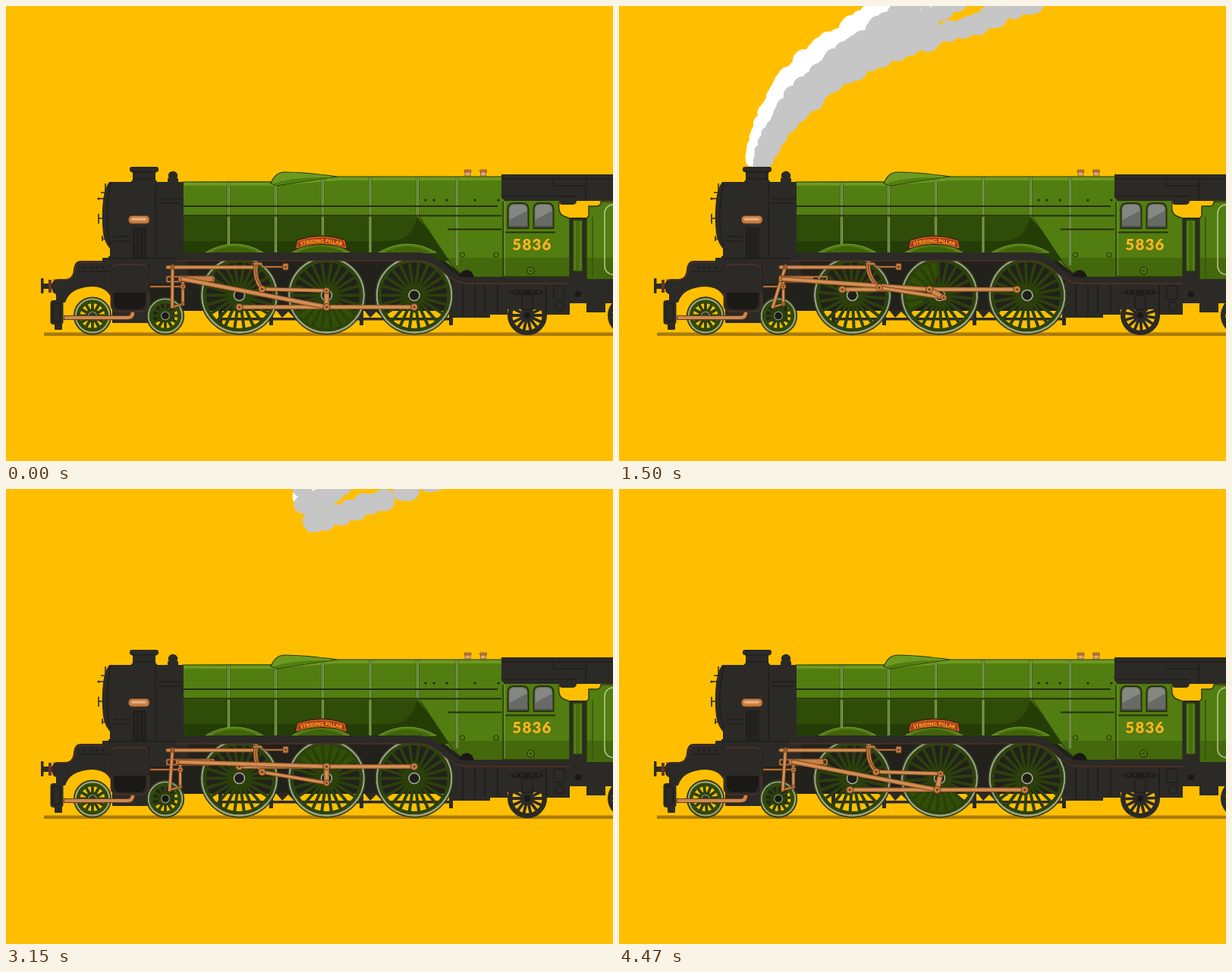
These frames come from a looping animation (800 by 600 pixels, 4500 ms). An HTML page:

```html
<!DOCTYPE html>
<html lang="en">
<head>
<meta charset="utf-8">
<title>Steam locomotive</title>
<style>
html, body { margin: 0; width: 100%; height: 100%; overflow: hidden; background: #ffbf00; }
svg { display: block; width: 800px; height: 600px; }
</style>
</head>
<body>
<svg id="stage" viewBox="0 0 800 600" xmlns="http://www.w3.org/2000/svg"></svg>
<script>
const LOOP = 4500, STEP = 30, TURN = 900;
const INK = '#2c2a26', DEEP = '#1f1e1a', LINE = '#1a1916';
const GREEN = '#527d10', LIGHT = '#6c9a20', SHADE = '#2f4c08', MOSS = '#2b400b';
const COPPER = '#c67f42', RUST = '#6b3a1c', GOLD = '#f6b71e', RED = '#693326', TYRE = '#98a18c';

const stage = document.getElementById('stage');

// Markup helpers
const path = (d, fill, more = '') => `<path d="${d}" fill="${fill}" ${more}/>`;
const rect = (x, y, w, h, fill, rx = 0, more = '') =>
  `<rect x="${x}" y="${y}" width="${w}" height="${h}" rx="${rx}" fill="${fill}" ${more}/>`;
const dot = (x, y, r, fill, more = '') => `<circle cx="${x}" cy="${y}" r="${r}" fill="${fill}" ${more}/>`;
const stroke = (d, color, w = 1) => path(d, 'none', `stroke="${color}" stroke-width="${w}"`);
const edge = (color, w = 1) => `stroke="${color}" stroke-width="${w}"`;
const f = n => n.toFixed(2);

function spokes(count, from, to, color, w) {
  let d = '';
  for (let i = 0; i < count; i++) {
    const a = i / count * Math.PI * 2, c = Math.cos(a), s = Math.sin(a);
    d += `M${f(c * from)},${f(s * from)}L${f(c * to)},${f(s * to)}`;
  }
  return stroke(d, color, w);
}

function wheel(x, y, body, speed) {
  return `<g transform="translate(${x} ${y})"><g class="spin" data-speed="${speed}">${body}</g></g>`;
}

function driver(x, weight) {
  const body =
    (weight ? path('M-41,22 Q0,4 41,22 A46.5,46.5 0 0 1 -41,22Z', '#315006') : '') +
    spokes(22, 9, 46, MOSS, 4) +
    dot(0, 0, 45.8, 'none', edge('#2c430c', 4.6)) +
    dot(0, 0, 49.3, 'none', edge(TYRE, 2.4)) +
    dot(0, 0, 51.2, 'none', edge('#2d3b15', 1.6)) +
    path('M-11,0 A11,11 0 0 1 11,0 L7,16 A7,7 0 0 1 -7,16Z', MOSS) +
    dot(0, 0, 7, DEEP, edge('#a5ab98', 1.6));
  return wheel(x, 381.5, body, 1);
}

function bogie(x, dark) {
  const body =
    spokes(12, 6, 19, MOSS, 3.8) +
    dot(0, 0, 18.8, 'none', edge('#2f490d', 5)) +
    dot(0, 0, 22.3, 'none', edge(TYRE, 2)) +
    dot(0, 0, 24.2, 'none', edge('#2d3b15', 1.8)) +
    dot(0, 0, 9, MOSS) +
    dot(0, 0, 5.3, dark ? LINE : '#33391f', edge('#8d957d', 1.1));
  return wheel(x, 408.5, body, 2);
}

function trailer(x) {
  return wheel(x, 408, spokes(14, 6, 22, INK, 3.8) + dot(0, 0, 22.8, 'none', edge(INK, 6.4)) +
    dot(0, 0, 9, INK) + dot(0, 0, 4, LINE), 2);
}

function underframe() {
  return rect(50, 430.5, 750, 4.5, '#a97b0c') +
    path('M135,330 H640 V402 H235 L222,396 V416 H140 V400Z', '#22211c') +
    path('M61,365 Q63,360 70,360 H78 Q88,360 89,348 Q90,336 98,336 H240 V366 H190 V418 H140 ' +
      'Q148,371 114,370 Q84,371 78,391 H66 V380 Q61,378 61,374Z', INK) +
    rect(281, 411, 308, 3.5, INK) +
    [282, 349, 468, 586].map(x => rect(x - 2, 402, 5, 19, INK)).join('') +
    [372, 488].map(x => path(`M${x - 16},401 h32 l-8,10 l-8,-8 l-8,8Z`, INK)).join('') +
    rect(588, 362, 50, 49, INK) +
    path('M637,362 H800 V392 H790 V404 H765 V392 H743 V407 H712 V400 H661 V407 H637Z', INK);
}

function frontEnd() {
  return rect(138, 341, 49.5, 62, INK, 8, edge(RED)) +
    path('M142,378 H184 V390 Q184,400 174,400 H152 Q142,400 142,390Z', LINE) +
    stroke('M138,341 V378 M188,341 V378 M96,350 H135', LINE) +
    stroke('M62,361 H79 Q90,360 91,348 Q92,338 101,338 H234', RED) +
    rect(46, 359, 3.5, 20, INK, 1) + rect(49, 366, 14, 7, INK) + rect(56, 361, 4, 17, RED) +
    rect(58.5, 388, 17, 32, INK, 4) + rect(64, 417, 10, 10, INK, 1) +
    rect(61.5, 392, 10, 24, 'none', 3, edge(LINE)) +
    [104, 112, 120, 128].map(x => dot(x, 345, 1.3, LINE)).join('') +
    stroke('M76,411 H160 Q167,411 167,404', RUST, 6) + stroke('M77,411 H160 Q167,411 167,404', '#cd8a50', 4);
}

function smokebox() {
  return path('M136,232 H234 V334 H137 V320 Q130,312 128,300 Q125.5,278 128,256 Q130,240 136,232Z', INK) +
    stroke('M138,233 Q132,262 133,282 Q133,302 138,316 M197,233 V333 M201,254 H233 M201,260 H230', LINE) +
    rect(163, 212, 38, 7, INK, 3) + path('M167,218 H197 V229 L201,234 H163 L167,229Z', INK) +
    stroke('M166,219 H198 M168,228 H196', LINE) +
    dot(220, 224, 6.2, INK) + rect(213, 227, 14, 6, INK, 1) +
    stroke('M131,234 V249 M125,246 H133 M122,254 H129 M122,274 V287 M122,280 H128 M127,303 V310 M127,307 H132', INK, 1.6) +
    dot(122, 254, 1.6, INK) +
    rect(161.5, 276.5, 27.5, 10.5, COPPER, 4.5, edge(RUST)) + rect(165, 279.5, 20, 3.3, '#e8b184', 1.6) +
    rect(168, 293, 16, 39, '#262420', 1, edge(LINE)) + stroke('M173,294 V331 M179,294 V331', LINE) +
    stroke('M141,304 H164 M141,310 H164', LINE) +
    rect(127, 332, 112, 8, INK, 1) + stroke('M136,333 H233', LINE);
}

function boiler() {
  let s = path('M233,232 L352,231 L437,225 H655 V358 H606 L575,334 H233Z', GREEN) +
    path('M233,232 L352,231 L437,225 H655 V230 H437 L352,237 H233Z', LIGHT) +
    path('M233,278 H542 L586,334 H233Z', SHADE) +
    path('M233,310 H508 Q535,309 542,278 L590,336 H233Z', '#243d06') +
    path('M545,278 H655 V358 H607 Q592,350 583,335Z', GREEN) +
    path('M582,332 H655 V358 H607 Q592,350 583,335Z', '#44690d') +
    stroke('M545,278 L583,335 Q592,350 607,357', '#2a3d0c', 1.2);
  for (const x of [293.5, 355.5, 417.5, 480, 542.5, 594.5]) {
    const top = x < 400 ? 232 : 225, bottom = x > 590 ? 342 : x > 540 ? 278 : 325;
    const line = `M${x},${top} V${bottom}`;
    s += stroke(line, '#37570c', 4) + stroke(line, '#9db57a', 2.6) + stroke(line, '#486d12', .9);
  }
  s += stroke('M233,232 H352 M437,225 H655', '#29380d', 1.2) +
    stroke('M233,264 H648', '#243009', 2.2) + stroke('M200,276.5 H655', '#243009', 1.8) +
    stroke('M582,294.5 H655', '#243009', 2) +
    path('M349,234 Q355,219 367,219 Q392,219 437,225 Q394,231 357,237Z', LIGHT, edge('#29380d', 1.2)) +
    path('M353,234 Q376,225 430,226 Q390,231 357,236Z', GREEN) +
    [553, 564, 581, 618, 649].map(x => dot(x, 256, 1.6, '#1d2709')).join('') +
    [601.5, 646].map(x => dot(x, 328, 3, GREEN, edge('#2b400b', 1.2))).join('');
  for (const x of [604, 624.5])
    s += rect(x, 216, 9, 3.2, COPPER, 1, edge(RUST, .6)) + rect(x + 1, 219, 7, 5, '#e0a878', 0, edge(RUST, .6));
  return s;
}

function plate() {
  let s = '';
  for (const x of [301, 415, 529])
    s += path(`M${x - 38},325 Q${x},303 ${x + 38},325Z`, GREEN, edge('#7a9d35', 1)) +
      path(`M${x - 30},325 Q${x},309 ${x + 30},325Z`, '#416409');
  s += path('M225,332 L240,325 H546 Q562,326 577,341 Q592,357 606,357 H743 V366 H610 Q592,366 577,352 Q561,336 546,336 H225Z', INK) +
    path('M597,357 Q600,348 608,348 Q615,349 617,358Z', LINE) +
    stroke('M225,336 H546 Q561,337 577,352 Q592,366 610,366 H743', RED);
  return s;
}

function nameplate() {
  return path('M384,309 Q415.5,298 447,309 L449.5,320.5 Q415.5,307.5 381.5,320.5Z', '#b2331a',
      'stroke="#4b2510" stroke-width="2" stroke-linejoin="round"') +
    path('M385,309.8 Q415.5,299.4 446,309.8 L448,319 Q415.5,306.8 383,319Z', 'none', edge('#dc9b2a', .8)) +
    '<path id="arc" d="M383,318 Q415.5,306 448,318" fill="none"/>' +
    `<text font-family="Lato, sans-serif" font-weight="900" font-size="6.6" fill="${GOLD}" text-anchor="middle">` +
    '<textPath href="#arc" startOffset="50%">STRIDING PILLAR</textPath></text>';
}

function cabWindow(x, w) {
  return path(`M${x},293 V268 Q${x},260 ${x + 8},260 H${x + w - 8} Q${x + w},260 ${x + w},268 V293Z`, '#686a66', edge('#26330b', 2)) +
    path(`M${x + 2},282 V269 Q${x + 2},262 ${x + 9},262 H${x + w - 9} Q${x + w - 2},262 ${x + w - 2},270Z`, '#858782') +
    stroke(`M${x + 1},291 H${x + w - 1}`, '#4e504c', 2);
}

function cab() {
  return path('M653,256 H729 Q727,274 735,277 L743,280 V357 H653Z', GREEN) +
    rect(653, 332, 90, 25, '#44690d') +
    stroke('M729,258 Q727,274 735,277 L743,280 V357 H655 V258', '#29380d', 1.4) +
    stroke('M657.5,258 V355', '#7f9f46', .8) +
    cabWindow(661.5, 27) + cabWindow(695.5, 26) + stroke('M658,298.5 H724', '#26330b', 2) +
    dot(691.5, 349, 4.6, GREEN, edge('#26330b', 1.3)) + dot(691.5, 349, 2, '#35520b') +
    `<text x="693.5" y="322" font-family="Lato, sans-serif" font-weight="900" font-size="20.5" letter-spacing="1.2"
      text-anchor="middle" fill="${GOLD}" stroke="#6b5a10" stroke-width=".5" paint-order="stroke">5836</text>`;
}

function tender() {
  return rect(743, 279, 23, 113, INK) +
    rect(747, 282, 13, 68, '#456d0d', 1, edge('#24320a')) + stroke('M750,284 V348 M757,284 V348', '#7b9a3d', .8) +
    dot(754, 380, 4, LINE) +
    path('M765,362 V280 L768,277 V264 H778 Q784,264 784,258 H800 V362Z', GREEN) +
    rect(765, 332, 35, 30, '#44690d') +
    stroke('M800,258 H784 Q784,264 778,264 H768 V277 L765,280 V360', '#29380d', 1.4) +
    stroke('M773,278 V358', '#37570c', 1.6) +
    rect(789, 262, 40, 92, 'none', 11, edge('#b9c58f', 1.5)) +
    rect(765, 360, 35, 32, INK) +
    path('M653,222 H800 V257 H752 Q752,262 746,262 H733 Q729,262 729,257 H657 Q651,252 653,246Z', INK) +
    stroke('M653,228 H800 M721,228 V237 H765 V228 M655,251 H752 M764,238 V257', LINE);
}

function truck() {
  return rect(660, 366, 52, 34, INK) + rect(668, 374, 38, 7, DEEP, 2) +
    stroke('M602,367 V409 M618,367 V409 M631,367 V405 M648,368 V404 M662,378 H712 M712,368 V405', LINE, 1.2) +
    [672, 680, 694, 702].map(x => dot(x, 377, 2, INK)).join('') +
    rect(680, 382, 14, 18, INK, 1, edge(LINE)) + dot(730, 396, 6, INK, edge(LINE)) +
    rect(722, 369, 14, 18, INK, 2, edge(LINE));
}

stage.innerHTML =
  rect(0, 0, 800, 600, '#ffbf00') +
  '<path id="white" fill="#fff"/><path id="grey" fill="#c6c6c6"/>' +
  underframe() + trailer(687) + trailer(819) + truck() +
  driver(307.5, false) + driver(422.5, true) + driver(538, false) +
  bogie(114, false) + bogie(210, true) +
  frontEnd() + boiler() + smokebox() + plate() + nameplate() + cab() + tender() +
  '<g id="gear"></g>';

// Copper motion parts
function rod(a, b, w) {
  const d = `M${f(a[0])},${f(a[1])}L${f(b[0])},${f(b[1])}`;
  const cap = (color, size) => path(d, 'none', `stroke="${color}" stroke-width="${size}" stroke-linecap="round"`);
  return cap(RUST, w) + cap(COPPER, w - 1.4) + (w > 4 ? cap('#d89a62', w * .22) : '');
}
const pin = (p, r) => dot(f(p[0]), f(p[1]), r, COPPER, edge(RUST)) + dot(f(p[0]), f(p[1]), r * .35, RUST);

function gear(angle) {
  const px = 15.5 * Math.sin(angle), py = 15.5 * Math.cos(angle);
  const crank = x => [x + px, 381.5 + py];
  const mid = crank(422.5), first = crank(307.5), last = crank(538);
  const headX = mid[0] - Math.sqrt(193 ** 2 - (mid[1] - 360) ** 2);
  const head = [headX, 360], drop = [headX, 370], foot = [headX, 393];
  const ecc = [422.5 - px * .4, 381.5 - py * .4];
  const pivot = [331.5, 348];
  const linkX = ecc[0] - 85;
  const link = [linkX, pivot[1] + Math.sqrt(26 ** 2 - (linkX - pivot[0]) ** 2)];
  const lean = Math.atan2(pivot[0] - link[0], link[1] - pivot[1]) * 180 / Math.PI;
  const swing = [headX - 14, 397];

  return rod([191, 370], drop, 3) +
    rect(212, 357, 62, 6.5, 'none', 1, edge(RUST, 2.6)) + rect(212, 357, 62, 6.5, 'none', 1, edge(COPPER, 1.4)) +
    rod(foot, swing, 3.6) + rod(head, foot, 4.6) +
    rod([338, 344], [366, 344], 2.8) + rect(365, 339.5, 7, 8.5, COPPER, 1, edge(RUST)) + dot(368.5, 344, 1.5, RUST) +
    rod([213, 344.5], [326, 344.5], 5.4) +
    rod([219.5, 343], swing, 5) + pin([219.5, 345], 2.2) +
    `<g transform="translate(${pivot}) rotate(${f(lean)})">` +
      stroke('M1,-10 Q-8,7 0,26', RUST, 6.2) + stroke('M1,-9 Q-8,7 0,26', COPPER, 4.6) +
      stroke('M0,-7 Q-7,7 -1,21', RUST, 1) + '</g>' +
    rod([327, 340], [336, 340], 4) +
    rod(first, last, 6.2) + pin(first, 4.6) + pin(last, 4.6) +
    rect(f(headX - 6), 356, 46, 7.5, COPPER, 1, edge(RUST)) +
    rod(head, mid, 6.4) + pin(drop, 3.6) + pin(foot, 2.4) +
    rod(link, ecc, 5.6) + pin(link, 4.6) +
    rod(mid, ecc, 7.5) + pin(mid, 4.6) + pin(ecc, 4);
}

// Smoke: two white lanes on the windward side, three grey ones over them
const LANES = 5;
let seed = 17;
const rand = () => (seed = (seed * 16807) % 2147483647) / 2147483647;
const puffs = Array.from({ length: 112 * LANES }, (_, i) => ({
  lane: i % LANES, born: .04 + i / LANES * .02, sway: rand() * 6 - 3, size: .88 + rand() * .24, pace: .97 + rand() * .05
}));

function puffShape(p, t) {
  const a = (t - p.born) * p.pace;
  if (a <= 0 || a > 1.45) return '';
  const late = Math.max(0, a - .8);
  const x = 182 + 75 * a + 205 * a * a;
  const y = 213 - 305 * a + 107 * a * a - 200 * late * late;
  const dx = 75 + 410 * a, dy = -305 + 214 * a - 400 * late, len = Math.hypot(dx, dy);
  const half = Math.min(30, 18 + 32 * a), full = Math.min(13.5, 8.5 + 11 * a);
  const windward = full - half - 40 * a * a, lee = half - full, core = -60 * a ** 4;
  const lane = [windward, windward / 2, core, (core + lee) / 2, lee][p.lane];
  const off = lane + p.sway * Math.min(1, a * 4);
  const r = full * p.size * Math.min(1, .6 + a * 8);
  const cx = x - dy / len * off, cy = y + dx / len * off;
  return `M${f(cx - r)},${f(cy)}a${f(r)},${f(r)} 0 1 0 ${f(2 * r)},0a${f(r)},${f(r)} 0 1 0 ${f(-2 * r)},0`;
}

const white = document.getElementById('white'), grey = document.getElementById('grey');
const motion = document.getElementById('gear'), spinners = [...document.querySelectorAll('.spin')];

function draw(ms) {
  const t = Math.floor(ms % LOOP / STEP) * STEP;
  const turn = t / TURN;
  for (const s of spinners) s.setAttribute('transform', `rotate(${f(-360 * turn * s.dataset.speed)})`);
  motion.innerHTML = gear(turn * Math.PI * 2);
  const cloud = test => puffs.filter(test).map(p => puffShape(p, t / 1000)).join('') || 'M0,0';
  white.setAttribute('d', cloud(p => p.lane < 2));
  grey.setAttribute('d', cloud(p => p.lane >= 2));
}

const start = performance.now();
function tick() {
  draw(performance.now() - start);
  requestAnimationFrame(tick);
}
tick();
</script>
</body>
</html>
```
